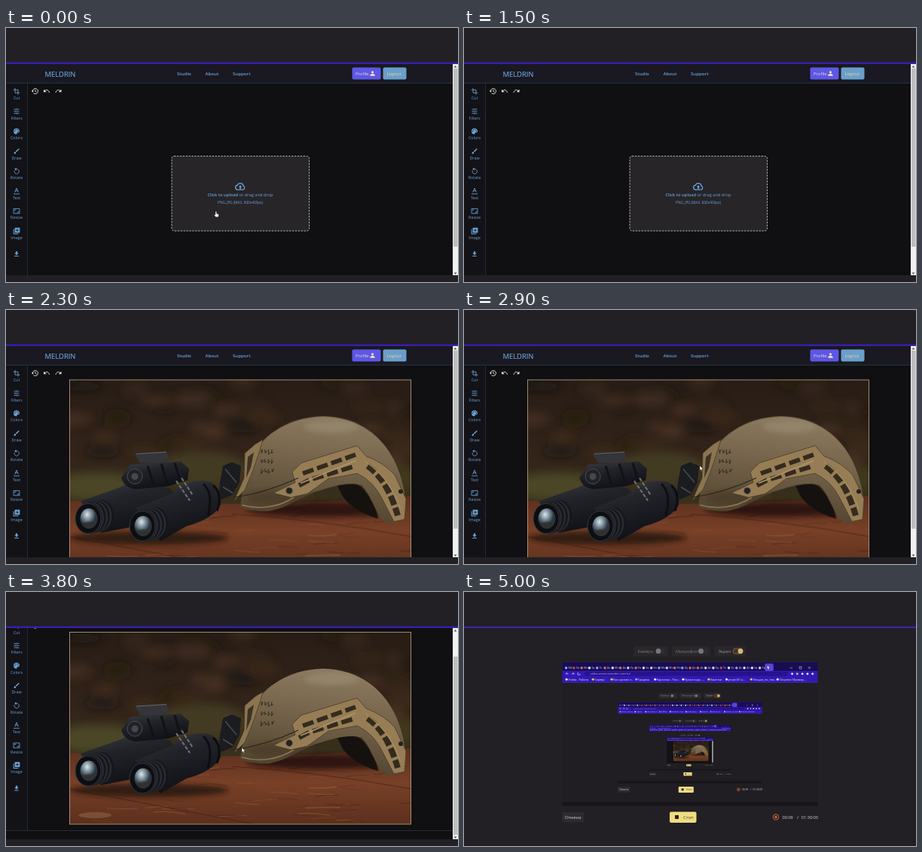
Recreate the animation shown at these times as an HTML page. Size 600 px wide and 338 px high, loop 5.1 s.

```html
<!DOCTYPE html>
<html lang="en">
<head>
<meta charset="utf-8">
<title>Image editor demo</title>
<style>
html, body { margin: 0; width: 100%; height: 100%; overflow: hidden; background: #222024; }
svg { display: block; width: 100vw; height: 100vh; font-family: "Open Sans", "Noto Sans", sans-serif; }
</style>
</head>
<body>
<svg id="stage" viewBox="0 0 600 338"></svg>
<script>
const LOOP = 5100, STEP = 100, SCROLL = 39.5;
const BLUE = '#69a3d8';
const stage = document.getElementById('stage');

let seed = 11;
const rnd = (a = 0, b = 1) => {
  seed = (seed * 16807) % 2147483647;
  return a + (b - a) * seed / 2147483647;
};
const pick = list => list[Math.floor(rnd(0, list.length))];
const many = (n, make) => Array.from({ length: n }, (_, i) => make(i)).join('');

const rect = (x, y, w, h, fill, extra = '') =>
  `<rect x="${x}" y="${y}" width="${w}" height="${h}" fill="${fill}" ${extra}/>`;
const circle = (x, y, r, fill, extra = '') =>
  `<circle cx="${x}" cy="${y}" r="${r}" fill="${fill}" ${extra}/>`;
const oval = (x, y, rx, ry, fill, extra = '') =>
  `<ellipse cx="${x}" cy="${y}" rx="${rx}" ry="${ry}" fill="${fill}" ${extra}/>`;
const shape = (d, fill, extra = '') => `<path d="${d}" fill="${fill}" ${extra}/>`;
const line = (d, color, w = 1, extra = '') =>
  `<path d="${d}" fill="none" stroke="${color}" stroke-width="${w}" ${extra}/>`;
const text = (x, y, size, fill, str, extra = '') =>
  `<text x="${x}" y="${y}" font-size="${size}" fill="${fill}" ${extra}>${str}</text>`;
const group = (inner, extra = '') => `<g ${extra}>${inner}</g>`;
const MID = 'text-anchor="middle"', END = 'text-anchor="end"', SEMI = 'font-weight="600"';

// Icons live on a 24-unit grid and are centred on (x, y).
const icon = (x, y, size, color, inner) => group(inner,
  `transform="translate(${x - size / 2} ${y - size / 2}) scale(${size / 24})" fill="none" stroke="${color}" color="${color}" stroke-width="2.2"`);
const solid = d => `<path d="${d}" fill="currentColor" stroke="none"/>`;
const open = d => `<path d="${d}"/>`;

const ICONS = {
  crop: open('M7 1V17H23M1 7H17V23'),
  tune: open('M3 5H12M16 5H21M14 2V8M3 12H7M11 12H21M9 9V15M3 19H12M16 19H21M14 16V22'),
  palette: solid('M12 2a10 10 0 0 0 0 20c1.5 0 2-1 1.6-2-1-2 0-3.300 1.400-3.300H17c3 0 5-2.300 5-5C22 6 17.500 2 12 2z') +
    [[6, 12], [9, 7], [15, 7], [18, 12]].map(p => circle(...p, 1.6, '#131216', 'stroke="none"')).join(''),
  brush: solid('M7 14c-1.700 0-3 1.300-3 3 0 1.300-1.200 2-2 2 1 1.200 2.500 2 4 2 2.200 0 4-1.800 4-4 0-1.700-1.300-3-3-3zM20.700 3.300a1.500 1.500 0 0 0-2.200 0L9 12.300 11.700 15l9-9.500a1.500 1.500 0 0 0 0-2.200z'),
  rotate: open('M8 5H13A8 8 0 1 1 5 10') + solid('M11 0V10L5 5z'),
  letter: open('M6 16L12 2L18 16M8 11H16M2 21.500H22'),
  resize: open('M2 4H22V20H2zM6 11V8H10M18 13V16H14'),
  image: solid('M6 1H23V18H6zM1 6H3.500V20.500H18V23H1z') +
    `<path d="M14.500 5V14M10 9.500H19" stroke="#131216"/>`,
  download: solid('M9 3h6v6h4.500L12 16.500 4.500 9H9zM4.500 18.500h15V21h-15z'),
  history: open('M4 12A9 9 0 1 1 7 19M13 7V13L17 15') + solid('M0 11H8L4 16z'),
  undo: open('M5 11C11 6 19 8 21 17') + solid('M2 6V15H11z'),
  redo: open('M19 11C13 6 5 8 3 17') + solid('M22 6V15H13z'),
  person: solid('M12 3a4.500 4.500 0 1 0 .01 0zM3 21v-2c0-4 5-5.500 9-5.500s9 1.500 9 5.500v2z'),
  cloud: open('M7 19H18.500A4.500 4.500 0 0 0 19 10.500A7 7 0 0 0 5.500 9A5 5 0 0 0 7 19z') + solid('M10.500 17v-4H8l4-4 4 4h-2.500v4z')
};

const defs = `<defs>
  <clipPath id="view"><rect y="48" width="593" height="281"/></clipPath>
  <clipPath id="frame"><rect x="84" y="53" width="454" height="256"/></clipPath>
  <filter id="soft" x="-20%" y="-20%" width="140%" height="140%"><feGaussianBlur stdDeviation="6"/></filter>
  <filter id="haze" x="-20%" y="-60%" width="140%" height="220%"><feGaussianBlur stdDeviation="3"/></filter>
  <linearGradient id="woods" x2="0" y2="1"><stop stop-color="#281d16"/><stop offset=".4" stop-color="#33241a"/><stop offset=".62" stop-color="#37301c"/></linearGradient>
  <linearGradient id="table" x2="0" y2="1"><stop stop-color="#5c301f"/><stop offset=".45" stop-color="#784027"/><stop offset="1" stop-color="#5b2f1d"/></linearGradient>
  <linearGradient id="shell" x1=".6" x2=".4" y2="1"><stop stop-color="#8d7c60"/><stop offset=".45" stop-color="#74634a"/><stop offset="1" stop-color="#4e412d"/></linearGradient>
  <linearGradient id="tube" x2=".4" y2="1"><stop stop-color="#3d3f45"/><stop offset=".4" stop-color="#22242a"/><stop offset="1" stop-color="#101115"/></linearGradient>
  <radialGradient id="glass" cx=".4" cy=".3"><stop stop-color="#dfe6e8"/><stop offset=".45" stop-color="#8497a4"/><stop offset="1" stop-color="#2a343d"/></radialGradient>
</defs>`;

function backdrop() {
  const tones = ['#4f3525', '#17120e', '#45301f', '#1d1711', '#3d2a1e'];
  const blobs = many(46, () => oval(rnd(84, 538), rnd(55, 185), rnd(8, 26), rnd(5, 14), pick(tones), `opacity="${rnd(.3, .75)}"`));
  const moss = oval(120, 195, 60, 18, '#4b4726') + oval(260, 172, 60, 24, '#433a20') + oval(530, 185, 22, 16, '#40371e');
  const grain = many(60, () => {
    const x = rnd(84, 530), y = rnd(228, 309), w = rnd(8, 46);
    return line(`M${x} ${y}q${w / 2} ${rnd(-3, 3)} ${w} ${rnd(-3, 3)}`, pick(['#9b6344', '#482417', '#8a5034', '#532a1b']), rnd(.4, 1.5), 'opacity=".55"');
  });
  return rect(84, 53, 454, 256, 'url(#woods)') + group(blobs + moss, 'filter="url(#soft)"') +
    shape('M84 214Q300 226 538 208V310H84z', 'url(#table)') + grain +
    line('M84 262Q180 280 330 309M300 232Q420 240 538 262', '#43210f', 1.2, 'opacity=".7"') +
    oval(118, 297, 22, 4, '#a98262', 'opacity=".35"') +
    group(oval(190, 264, 105, 9, '#24120c') + oval(420, 226, 100, 10, '#21110b'), 'filter="url(#haze)" opacity=".8"');
}

function helmet() {
  const marks = many(3, r => many(4, i => {
    const x = 339 + i * 4.700, y = 146 + r * 13;
    return line(`M${x} ${y}l${rnd(-1, 1)} ${rnd(4, 7)}l${rnd(1, 4)} ${rnd(-5, 0)}`, '#28231b', .9);
  }));
  return shape('M440 194C456 182 480 190 494 238C478 234 455 222 446 207z', '#15110e') +
    shape('M311 222C314 200 318 180 326 160C335 132 370 103 421 102C470 103 500 130 515 160C526 182 533 212 530 236C522 246 503 246 497 238C488 222 484 206 472 194C455 188 430 196 412 202C390 210 372 224 350 228C336 229 318 227 311 222z', 'url(#shell)') +
    group(oval(432, 116, 36, 8, '#aaa08a', 'opacity=".35"') + oval(365, 210, 45, 10, '#41351f', 'opacity=".5"'), 'filter="url(#haze)"') +
    line('M313 220C335 226 360 224 382 210', '#8b7754', 1.6) + marks +
    shape('M355 204L384 190L380 176L392 164L466 141L478 155Q502 164 516 180L531 212L529 239L515 242L500 213Q488 188 466 178L428 185L400 205L378 210z', '#967d55', 'stroke="#4a3c27" stroke-width=".8"') +
    line('M389 194L402 187L464 168M394 178L464 153', '#342b1e', 6, 'stroke-dasharray="15 5"') +
    line('M480 168Q506 186 520 234', '#342b1e', 8, 'stroke-dasharray="13 4"') +
    line('M391 191L464 161', '#ad936a', 1.8) + line('M477 162Q510 184 524 226', '#a58a61', 1.5) +
    circle(376, 201, 4.5, '#222126', 'stroke="#74664d"') + circle(524, 202, 3, '#24201c') +
    shape('M303 214L316 184L317 151L331 139L341 133L335 153L327 176L317 200z', '#8b7450', 'stroke="#43371f" stroke-width=".7"') +
    shape('M321 156L329 150L325 170L319 184z', '#3c3323') +
    line('M302 210Q345 204 388 184', '#2a2318', 1.1);
}

// One objective: knurled ring, rim and lens.
const lens = (x, y) => many(7, i => oval(x + 17 - i * 2.600, y - 4 + i * .6, 17, 21, i % 2 ? '#292b31' : '#15161a')) +
  oval(x, y, 17, 20, '#0d0e11', 'stroke="#373940"') + oval(x + 1, y, 11.5, 13.5, 'url(#glass)') +
  shape(`M${x - 8} ${y + 7}Q${x + 2} ${y + 1} ${x + 11} ${y + 7}Q${x + 3} ${y + 15} ${x - 5} ${y + 11}z`, '#343027', 'opacity=".65"');

function goggles() {
  return shape('M284 190L288 168L300 163L312 168L310 190L300 207L282 214z', '#1b1c20') +
    line('M291 172L306 190M288 196L301 204', '#494a4f', 1.5) +
    shape('M99 215L150 197L172 187L218 198L238 224L184 246L126 257z', 'url(#tube)') + lens(109, 238) +
    shape('M153 184L165 166L232 162L243 172L241 187L215 195L172 199Q157 197 153 184z', 'url(#tube)') +
    line('M188 168L196 193M206 165L214 191M224 164L231 188', '#111216', 3) +
    circle(171, 182, 10, '#202227', 'stroke="#4b4d53"') + circle(171, 182, 4.5, '#45474c') +
    shape('M171 152L213 149L216 157L206 164L178 164z', '#34353a') + line('M173 152L213 149.500', '#65666a', 1.2) +
    shape('M172 224L222 204Q240 184 270 189Q287 196 285 220Q274 239 240 248L205 268z', 'url(#tube)') +
    line('M226 188L244 214M233 184L248 207', '#6b6d70', 2.2, 'stroke-dasharray="5 2"') +
    line('M262 192Q276 205 268 234M275 194Q288 205 280 228', '#0d0e11', 3) +
    lens(181, 248);
}

const photo = group(group(backdrop() + helmet() + goggles(), 'clip-path="url(#frame)"') +
  rect(84.5, 53.500, 453, 255.500, 'none', 'stroke="#a9987b" stroke-width=".9"'), 'id="photo"');

function editor() {
  const tools = [['crop', 'Cut'], ['tune', 'Filters'], ['palette', 'Colors'], ['brush', 'Draw'],
    ['rotate', 'Rotate'], ['letter', 'Text'], ['resize', 'Resize'], ['image', 'Image']];
  const side = tools.map(([name, label], i) => icon(14, 84.3 + i * 26.550, 9.5, BLUE, ICONS[name]) +
    text(14, 95 + i * 26.550, 5.4, BLUE, label, MID)).join('') + icon(14, 300.500, 9, BLUE, ICONS.download);
  const head = rect(0, 40, 593, 33, '#1a1821') + rect(0, 72.800, 593, .9, '#263d49') +
    text(51.500, 64.5, 9.4, BLUE, 'MELDRIN', 'stroke="#69a3d8" stroke-width=".15"') +
    text(227, 63.2, 6.1, BLUE, 'Studio', SEMI) + text(264.500, 63.2, 6.1, BLUE, 'About', SEMI) +
    text(301, 63.2, 6.1, BLUE, 'Support', SEMI) +
    rect(459.500, 52.500, 38, 16, '#5d57e6', 'rx="2"') + text(464, 63, 5.9, '#efd9c4', 'Profile') +
    icon(486.500, 60.5, 8.5, '#f3dfc0', ICONS.person) +
    rect(500.500, 52.500, 31, 16, '#6a9fca', 'rx="2"') + text(505.500, 63, 5.9, '#f0d3a6', 'Logout');
  const drop = rect(220, 170.500, 182.500, 99.500, '#272528', 'rx="3" stroke="#c4c4c6" stroke-width=".9" stroke-dasharray="2.400 1.500"') +
    icon(311, 211, 14, BLUE, ICONS.cloud) +
    text(311, 224, 5.7, BLUE, '<tspan font-weight="600">Click to upload</tspan> or drag and drop', MID) +
    text(311, 233.6, 4.700, BLUE, 'PNG, JPG (MAX. 800x400px)', MID);
  return rect(0, 48, 593, 330, '#100f11') + rect(0, 73.5, 28, 283, '#131216') + head +
    rect(28, 73.5, .9, 283, '#22343e') + rect(0, 356.5, 593, .9, '#22343e') + side +
    ['history', 'undo', 'redo'].map((n, i) => icon(38.500 + i * 15.5, 84, 9.5, '#f2f2f2', ICONS[n])).join('') +
    group(drop, 'id="drop"') + group(photo, `id="shot" transform="translate(0 ${SCROLL})"`);
}

const scrollbar = rect(593, 48, 7, 281, '#f1f1f1') + rect(594, 54, 5.5, 237, '#bdbdbf', 'id="thumb"') +
  shape('M594.500 52.500L596.500 50L598.500 52.500zM594.500 325.500L596.500 328L598.500 325.500z', '#555');

// Browser bar as it appears inside a preview, in stage units.
function chrome() {
  const tabs = many(26, i => {
    const x = 6 + i * 18.200;
    return circle(x + 3, 13, 3, pick(['#e8e8ee', '#e07a3c', '#8ab0e8', '#c84b3a', '#d9d9e2'])) +
      text(x + 8, 15.5, 6.5, '#d2cdf0', pick(['Хд', 'До', 'Ка', 'Me', 'Те', 'Ур']));
  });
  const marks = ['Учёба - Работа', 'Сервер', 'Как сделать т…', 'Графика', 'Картинки - Пои…', 'Уроки кода -…', 'Заметки', 'project01.a…', 'Лекции_по_тем…', 'Сборник (Пример…'];
  const widths = [62, 44, 58, 44, 66, 60, 42, 58, 62, 60];
  let x = 14;
  const books = marks.map((m, i) => {
    const out = circle(x - 4, 40, 2.800, pick(['#f0f0f4', '#e8c04a', '#7fb2f0'])) + text(x, 42.500, 6.6, '#f0eefc', m);
    x += widths[i];
    return out;
  }).join('');
  return rect(0, 0, 600, 47, '#3218b4') + rect(0, 0, 600, 20, '#180d52') + rect(476, 3, 20, 17, '#5b43dc', 'rx="3"') + tabs +
    line('M535 13h6M557 10h5v5h-5zM578 10l5 5M583 10l-5 5', '#dcd8f5', 1) +
    rect(52, 22, 478, 10, '#26128d', 'rx="5"') +
    text(66, 29.5, 6.6, '#b9aef0', 'video-screen-recorder.com/ru/') +
    line('M14 27h-6l3-3M22 27h6l-3-3M38 24a3 3 0 1 0 4 3', '#f0eefc', 1.2) +
    many(5, i => circle(540 + i * 12, 27, 2.600, i === 1 ? '#e0bb4a' : '#e4e0f6')) + books;
}

function recorder(depth) {
  const pill = (x, w, label, on) => rect(x, 72, w, 13.5, '#29272a', 'rx="2"') +
    text(x + 5.500, 80.6, 5.6, on ? '#9a989a' : '#7b797c', label) +
    rect(x + w - 17, 75.2, 13, 7, on ? '#40342a' : '#2f2d30', `rx="3.500" ${on ? 'stroke="#9b7350" stroke-width=".7"' : ''}`) +
    circle(x + w - (on ? 7 : 13), 78.7, 3.4, on ? '#d8b476' : '#78767a');
  const inner = depth < 3
    ? recorder(depth + 1)
    : rect(0, 0, 600, 338, '#121114') + chrome() + '<use href="#photo"/>' + rect(588, 48, 12, 281, '#d8d8da');
  return rect(0, 0, 600, 338, depth ? '#201e22' : '#222024') +
    (depth ? chrome() : '') + rect(0, 45.8, 600, 2.2, '#3c26ac') +
    pill(225, 46, 'Камера') + pill(275.500, 52, 'Микрофон') + pill(332, 42, 'Экран', true) +
    group(inner, 'transform="translate(130.500 93.650) scale(.565)"') +
    rect(130, 293, 29, 13.5, '#2d2b2f', 'rx="2"') + text(144.5, 301.600, 5.900, '#d0ced0', 'Отмена', MID) +
    rect(273, 292.500, 35.500, 14.5, '#f0dc82', 'rx="2"') + rect(280, 297, 5, 5, '#28220f') +
    text(291, 301.800, 5.9, '#4b3d1c', 'Стоп') +
    circle(414, 299.500, 3.8, '#3a2620', 'stroke="#c8653c" stroke-width=".9"') + rect(412.6, 298.1, 2.800, 2.8, '#cf6a40') +
    text(422.500, 301.700, 5.600, '#d4d2d4', '00:09') + text(442, 301.700, 5.6, '#c4c2c4', '/') +
    text(470, 301.700, 5.600, '#d4d2d4', '01:30:00', END) +
    (depth ? rect(0, 329, 600, 9, '#171519') : '');
}

const arrow = shape('M0 0V6.500L1.600 5.200L2.700 7.400L3.700 6.900L2.700 4.800H4.700z', '#fff', 'stroke="#111" stroke-width=".45"');
const hand = shape('M-1 0Q0 -.8 .6 0V2.500L3 3.200Q3.600 3.500 3.400 4.500L2.800 7H-.6L-2.600 4.400Q-2.400 3.400 -1 4z', '#fff', 'stroke="#111" stroke-width=".35"');

stage.innerHTML = defs +
  group(rect(0, 0, 600, 338, '#222024') +
    group(group(editor(), 'id="page"'), 'clip-path="url(#view)"') + scrollbar +
    rect(0, 45.6, 600, 2.400, '#371fae'), 'id="app"') +
  group(recorder(0) + group(arrow, 'transform="translate(402.500 97.500) scale(.8)"'), 'id="rec"') +
  group(hand, 'id="hand" transform="translate(279 244.500)"') + group(arrow, 'id="arrow"');

const $ = id => document.getElementById(id);
const show = (id, on) => $(id).setAttribute('display', on ? 'inline' : 'none');
const move = (id, x, y) => $(id).setAttribute('transform', `translate(${x} ${y})`);
const ramp = (t, a, b) => Math.min(1, Math.max(0, (t - a) / (b - a)));
const smooth = p => p * p * (3 - 2 * p);

function draw(time) {
  const t = Math.floor((time % LOOP) / STEP) * STEP;
  const live = t < 5000;
  show('app', live);
  show('rec', !live);
  show('drop', t < 1600);
  show('shot', t >= 1600);
  const p = smooth(ramp(t, 2900, 3100));
  move('page', 0, -SCROLL * p);
  move('thumb', 0, 32 * p);
  show('hand', t < 800);
  show('arrow', t >= 2500 && t <= 4500);
  const enter = 1 - smooth(ramp(t, 2500, 2800)), leave = smooth(ramp(t, 3900, 4500));
  move('arrow', 313 + 14 * enter + 105.500 * leave, 207 + 12 * enter - 162.500 * leave);
}

const start = performance.now();
function tick() {
  draw(performance.now() - start);
  requestAnimationFrame(tick);
}
tick();
</script>
</body>
</html>
```
